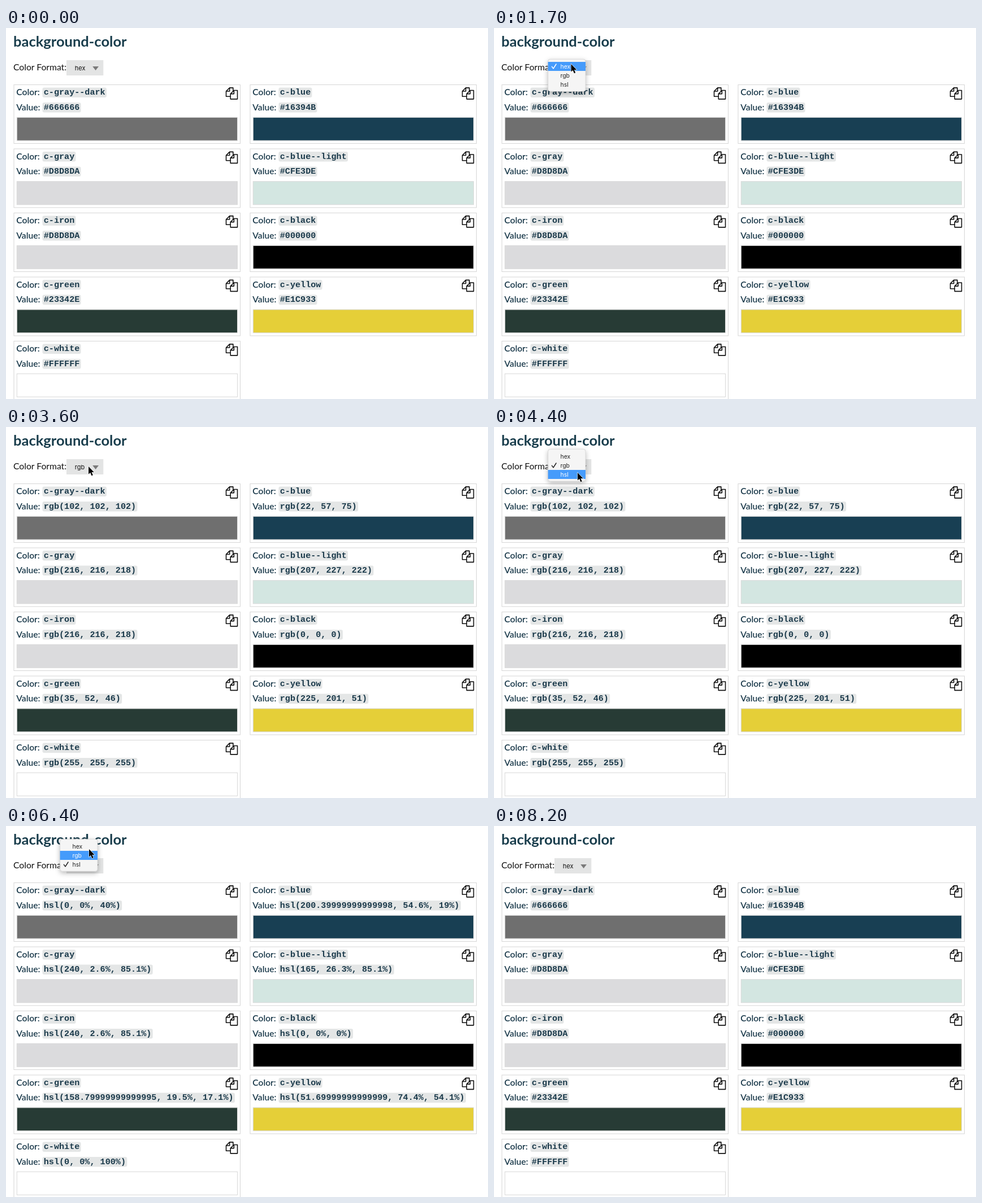
An HTML page that plays this animation: 853x657 px, repeating every 8.3 s.

```html
<!DOCTYPE html>
<html lang="en">
<head>
<meta charset="utf-8">
<title>background-color</title>
<style>
  html, body { margin: 0; width: 100%; height: 100%; overflow: hidden; background: #fff; }
  svg { display: block; width: 853px; height: 657px; }
  text { white-space: pre; }
  .title { font: 700 25.5px Lato, sans-serif; fill: #193d4c; }
  .plain { font: 400 15.7px Lato, sans-serif; fill: #111; }
  .label { font: 600 15.6px Lato, sans-serif; fill: #1b3a4b; }
  .code { font: 700 15.13px "Liberation Mono", monospace; fill: #1b3a4b; }
  .pick { font: 400 11px Inter, sans-serif; fill: #111; }
  .item { font: 400 10.4px Inter, sans-serif; }
</style>
</head>
<body>
<svg id="stage" viewBox="0 0 853 657">
  <defs>
    <filter id="shadow" x="-30%" y="-30%" width="160%" height="170%">
      <feDropShadow dx="0" dy="3" stdDeviation="4" flood-color="#000" flood-opacity=".28"/>
    </filter>
    <g id="copy" fill="none" stroke="#111" stroke-width="1.6" stroke-linejoin="round">
      <path d="M8.45 16.1H.77V6.9L6.9.77H13.06V6.9M6.9.77V6.9H.77"/>
      <path d="M8.45 11.5L14.6 5.38H20.74V20.74H8.45ZM14.6 5.38V11.5H8.45"/>
    </g>
  </defs>
</svg>
<script>
const LOOP = 8300, STEP = 100;
const CHAR = 9.08, ROW = 16;
const FORMATS = ["hex", "rgb", "hsl"];

// name, hex value, hsl value, painted colour
const COLORS = [
  ["c-gray--dark", "#666666", "hsl(0, 0%, 40%)", "#6f6f6f"],
  ["c-blue", "#16394B", "hsl(200.39999999999998, 54.6%, 19%)", "#183f53"],
  ["c-gray", "#D8D8DA", "hsl(240, 2.6%, 85.1%)", "#dbdbdd"],
  ["c-blue--light", "#CFE3DE", "hsl(165, 26.3%, 85.1%)", "#d3e6e1"],
  ["c-iron", "#D8D8DA", "hsl(240, 2.6%, 85.1%)", "#dbdbdd"],
  ["c-black", "#000000", "hsl(0, 0%, 0%)", "#000000"],
  ["c-green", "#23342E", "hsl(158.79999999999995, 19.5%, 17.1%)", "#273b35"],
  ["c-yellow", "#E1C933", "hsl(51.69999999999999, 74.4%, 54.1%)", "#e5cf38"],
  ["c-white", "#FFFFFF", "hsl(0, 0%, 100%)", "#ffffff"]
];

// each menu: opening, start of fade, closing time, ticked row
const MENUS = [
  { open: 1300, fade: 2500, close: 2800, picked: 0 },
  { open: 3700, fade: 4700, close: 5000, picked: 1 },
  { open: 5900, fade: 6900, close: 7200, picked: 2 }
];

// pointer stops: time, x, y
const STOPS = [
  [100, 205, 640], [400, 178, 325], [700, 150, 140], [1000, 138, 70],
  [1700, 136.5, 64], [1900, 137, 65], [2200, 140, 84], [2450, 141, 84],
  [2700, 234, 54], [3100, 236, 54], [3500, 146, 70], [4000, 147, 70],
  [4300, 148, 80], [4400, 148, 81], [4750, 149, 82], [5400, 218.5, 67.5],
  [5500, 218.5, 67.5], [5800, 147, 70], [6100, 147, 68], [6400, 147, 41],
  [6500, 147, 36], [6950, 147, 34], [7200, 215, 62], [7400, 222, 66],
  [7700, 222, 70], [8100, 215, 640]
];

const stage = document.getElementById("stage");

function add(parent, tag, attrs, text) {
  const el = document.createElementNS("http://www.w3.org/2000/svg", tag);
  for (const key in attrs) el.setAttribute(key, attrs[key]);
  if (text !== undefined) el.textContent = text;
  parent.appendChild(el);
  return el;
}

function set(el, attrs) {
  for (const key in attrs) el.setAttribute(key, attrs[key]);
}

function label(parent, cls, x, y, text) {
  return add(parent, "text", { class: cls, x, y }, text);
}

function chip(parent, y, text) {
  const box = add(parent, "rect", { x: 50.5, y, height: 17.4, rx: 3, fill: "#e4e6e6" });
  const code = label(parent, "code", 52.75, y + 12.9, "");
  const write = value => {
    box.setAttribute("width", value.length * CHAR + 4.5);
    code.textContent = value;
  };
  write(text);
  return write;
}

function toRgb(hex) {
  const parts = [1, 3, 5].map(i => parseInt(hex.slice(i, i + 2), 16));
  return `rgb(${parts.join(", ")})`;
}

function card([name, hex, hsl, paint], i) {
  const g = add(stage, "g", {
    transform: `translate(${14 + (i % 2) * 418} ${100.5 + Math.floor(i / 2) * 113.5})`
  });
  add(g, "rect", { x: 0, y: 0, width: 400.5, height: 104, fill: "#fff", stroke: "#d6d6d6" });
  label(g, "label", 4.3, 18.8, "Color:");
  chip(g, 5, name);
  label(g, "label", 4.3, 45.4, "Value:");
  const write = chip(g, 31.5, hex);
  add(g, "use", { href: "#copy", x: 374.8, y: 4.6 });
  add(g, "rect", { x: 5.3, y: 57.8, width: 390.2, height: 41, fill: paint, stroke: "#d8d8d8" });
  const values = [hex, toRgb(hex), hsl];
  return format => write(values[format]);
}

label(stage, "title", 13, 33, "background-color");
label(stage, "plain", 13, 75, "Color Format:");
add(stage, "rect", { x: 107, y: 57, width: 65.3, height: 27, fill: "#e3e4e4" });
const pick = label(stage, "pick", 121.8, 75, "hex");
add(stage, "path", { d: "M153.2 68H164L158.6 75Z", fill: "#7a7a7a" });
const writers = COLORS.map(card);

const menu = add(stage, "g", {});
add(menu, "rect", {
  x: 95.6, y: 0, width: 66.4, height: 57, rx: 4, fill: "#f5f5f5",
  stroke: "#c4c4c4", "stroke-width": .6, filter: "url(#shadow)"
});
const bar = add(menu, "rect", { x: 95.6, width: 66.4, height: ROW, fill: "#459bfb" });
const items = FORMATS.map((name, i) => label(menu, "item", 117.5, 16.7 + i * ROW, name));
const tick = add(menu, "path", {
  d: "M102.4 13.2L105 16.6L110 8.8", fill: "none", "stroke-width": 1.5,
  "stroke-linecap": "round", "stroke-linejoin": "round"
});

const pointer = add(stage, "path", {
  d: "M0 0V13.6L3.1 10.8L5.4 16.2L7.7 15.2L5.4 9.9H9.6Z",
  fill: "#000", stroke: "#fff", "stroke-width": 1.1, "paint-order": "stroke"
});

function pointerAt(t) {
  const i = STOPS.findIndex(stop => stop[0] > t);
  if (i < 1) return STOPS[i < 0 ? STOPS.length - 1 : 0].slice(1);
  const [t0, x0, y0] = STOPS[i - 1], [t1, x1, y1] = STOPS[i];
  const u = (t - t0) / (t1 - t0), k = u * u * (3 - 2 * u);
  return [x0 + (x1 - x0) * k, y0 + (y1 - y0) * k];
}

function drawMenu(t) {
  const m = MENUS.find(m => t >= m.open && t < m.close);
  menu.style.display = m ? "" : "none";
  if (!m) return;
  const top = 55.2 - m.picked * ROW;
  // the highlight trails the pointer by one step
  const y = pointerAt(Math.min(t, m.fade) - STEP)[1];
  const hover = Math.max(0, Math.min(2, Math.floor((y - top - 5) / ROW)));
  const ink = i => i === hover ? "#fff" : "#222";
  set(menu, {
    transform: `translate(0 ${top})`,
    opacity: Math.max(0, Math.min(1, 1 - (t - m.fade) / 245))
  });
  bar.setAttribute("y", 4.8 + hover * ROW);
  items.forEach((item, i) => item.setAttribute("fill", ink(i)));
  set(tick, { transform: `translate(0 ${m.picked * ROW})`, stroke: ink(m.picked) });
}

let shown = -1;
function draw(time) {
  const t = Math.floor((time % LOOP) / STEP) * STEP;
  const format = MENUS.filter(m => t >= m.close).length % 3;
  if (format !== shown) {
    shown = format;
    pick.textContent = FORMATS[format];
    writers.forEach(write => write(format));
  }
  drawMenu(t);
  const [x, y] = pointerAt(t);
  pointer.setAttribute("transform", `translate(${x} ${y})`);
  pointer.style.display = t >= 100 && t <= 8100 ? "" : "none";
}

const start = performance.now();
function tickFrame() {
  draw(performance.now() - start);
  requestAnimationFrame(tickFrame);
}
tickFrame();
</script>
</body>
</html>
```
